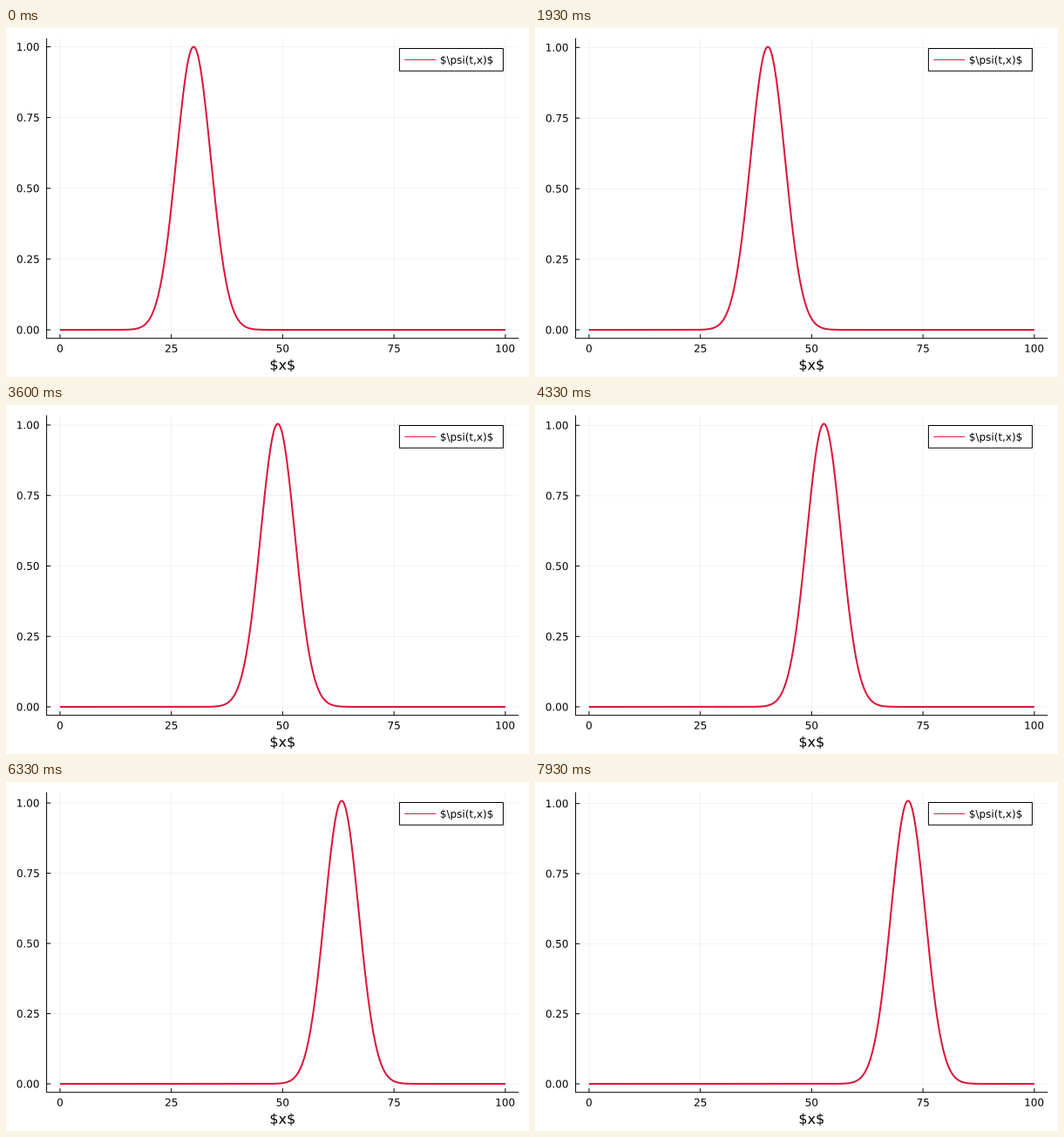
A matplotlib script that plays this animation: 600x400 px, repeating every 8 s.

```python
import numpy as np
import matplotlib.pyplot as plt
from matplotlib.animation import FuncAnimation
from matplotlib.patches import PathPatch, Rectangle
from matplotlib.textpath import TextPath
from matplotlib.transforms import Affine2D

W, H, DPI = 600, 400, 100
TICKS, TICK_MS = 400, 20                       # clock of the animation
PT = 72 / DPI                                  # one pixel in points
LEFT, RIGHT, TOP, BOTTOM = 46.6, 588.2, 11.8, 355.7
CRIMSON = "#dc143c"

SHIFT = 0.35                                   # travel per step
VAR0 = 15.0                                    # initial variance of the pulse
SHARPEN = 0.007                                # variance lost per unit travelled

x = np.linspace(0, 100, 1001)


def px(v):
    return 61.95 + 5.109 * np.asarray(v)


def py(v, peak):
    """Pixel row for a value when the axis is fitted to 0..peak plus 3 %."""
    unit = (BOTTOM - TOP) / 1.06
    return BOTTOM - unit * (0.03 + np.asarray(v) / peak)


def pulse(step):
    """Advected Gaussian, slowly sharpened by the scheme's negative diffusion."""
    travel = SHIFT * step
    var = VAR0 - SHARPEN * travel
    amp = np.sqrt(VAR0 / var)
    return amp * np.exp(-(x - 30 - travel) ** 2 / (2 * var)), amp


fig = plt.figure(figsize=(W / DPI, H / DPI), dpi=DPI, facecolor="white")
ax = fig.add_axes([0, 0, 1, 1])
ax.set(xlim=(0, W), ylim=(H, 0))
ax.axis("off")


def line(xs, ys, color="black", width=1.0, **kw):
    kw.setdefault("solid_capstyle", "butt")
    return ax.plot(xs, ys, color=color, lw=width * PT, snap=False, **kw)[0]


def grid_line(xs, ys):
    return line(xs, ys, width=0.5, alpha=0.1, zorder=1)


def place(patch, tx, ty):
    patch.set_transform(Affine2D().scale(1, -1).translate(tx, ty) + ax.transData)


def label(s, size, tx, ty, align="center"):
    """Text with its baseline at ty, aligned on its ink horizontally."""
    path = TextPath((0, 0), s.replace("$", r"\$"), size=size,
                    prop={"family": "DejaVu Sans"})
    box = path.get_extents()
    anchor = {"left": box.x0, "center": (box.x0 + box.x1) / 2, "right": box.x1}
    patch = PathPatch(path, facecolor="black", lw=0, zorder=6)
    ax.add_patch(patch)
    place(patch, tx - anchor[align], ty)
    return patch, tx - anchor[align]


# x axis
for v in range(0, 101, 25):
    grid_line([px(v)] * 2, [TOP, BOTTOM])
    line([px(v)] * 2, [BOTTOM, BOTTOM - 4.6], zorder=4)
    label(str(v), 12, px(v), 371.5)
label("$x$", 16, 317.3, 391.7)

# y axis, rescaled in every step
rows = []
for v in np.arange(5) / 4:
    grid = grid_line([LEFT, RIGHT], [0, 0])
    tick = line([LEFT, LEFT + 4.6], [0, 0], zorder=4)
    text, tx = label(f"{v:.2f}", 12, 37.7, 0, "right")
    rows.append((v, grid, tick, text, tx))

line([LEFT, LEFT, RIGHT], [TOP, BOTTOM, BOTTOM], zorder=4,
     solid_joinstyle="miter")
curve = line([], [], CRIMSON, 2, zorder=3, solid_joinstyle="round")

# legend
ax.add_patch(Rectangle((451.4, 23.5), 119, 25.7, facecolor="white",
                       edgecolor="black", lw=PT, snap=False, zorder=5))
line([457.3, 493.3], [36.4, 36.4], CRIMSON, zorder=6)
label(r"$\psi(t,x)$", 12, 498.8, 40.8, "left")


def update(tick_no):
    # 15 steps per second on the 20 ms clock
    u, peak = pulse((3 * tick_no + 2) // 10)
    curve.set_data(px(x), py(u, peak))
    for v, grid, tick, text, tx in rows:
        y = float(py(v, peak))
        grid.set_ydata([y, y])
        tick.set_ydata([y, y])
        place(text, tx, y + 4.4)
    return [curve]


anim = FuncAnimation(fig, update, frames=TICKS, interval=TICK_MS,
                     repeat=True, repeat_delay=0, blit=False)
plt.show()
```
